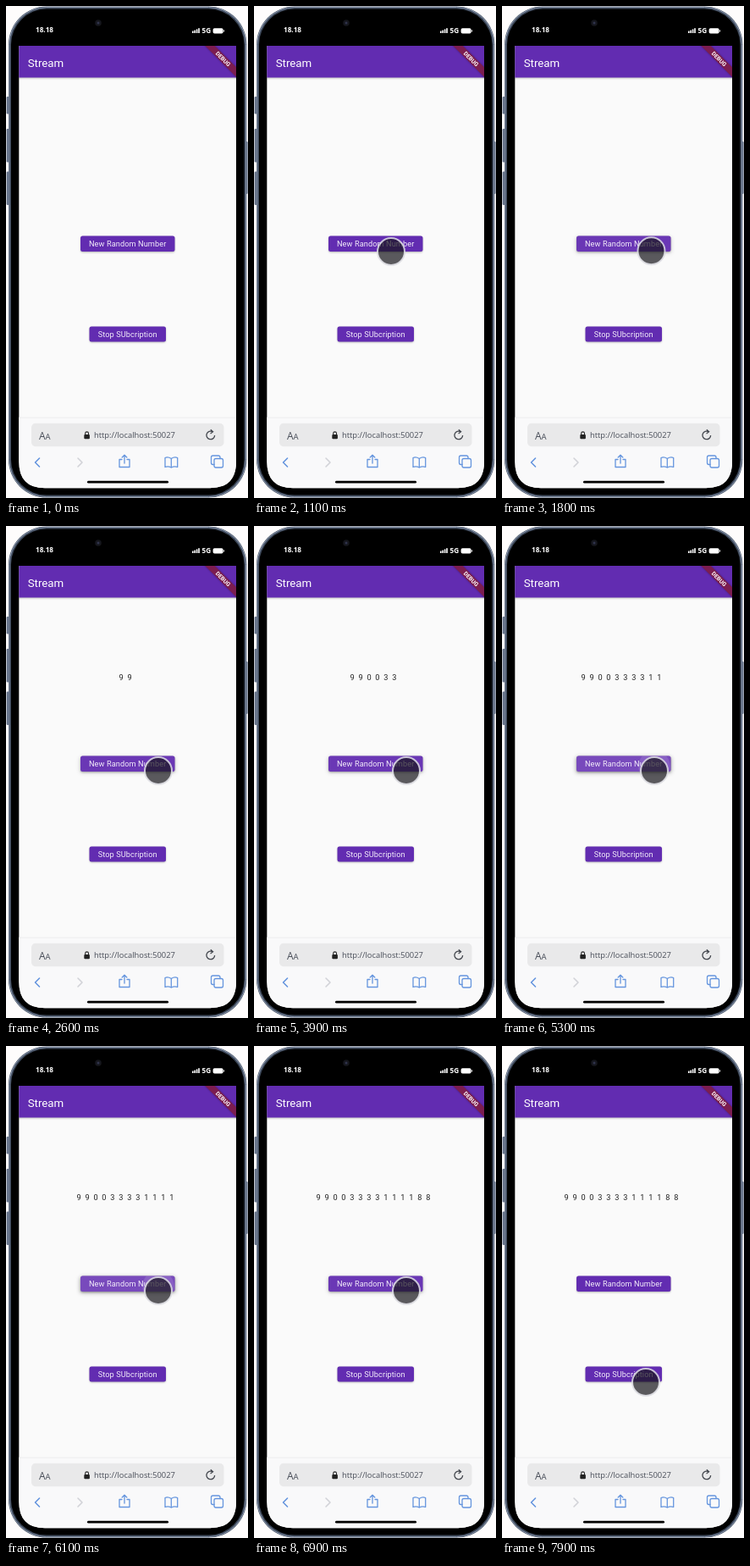
Write an HTML page that moves like this. It is 286x581 px and loops after 8000 ms.

```html
<!DOCTYPE html>
<html lang="en">
<head>
<meta charset="utf-8">
<title>Stream</title>
<style>
  html, body { margin: 0; width: 100%; height: 100%; overflow: hidden; background: #fefcfc; }
  svg { display: block; width: 100vw; height: 100vh; }
  text { font-family: Roboto, sans-serif; fill: #fff; white-space: pre; }
  .label { font-size: 9.2px; letter-spacing: .09px; text-anchor: middle; fill: #f3edfa; }
  .status { font-size: 8.2px; font-weight: 700; font-family: "Open Sans", sans-serif; }
  .bar { font-family: "Open Sans", sans-serif; fill: #484d58; }
  .icon { fill: none; stroke: #6595de; stroke-width: 1.3; stroke-linecap: round; stroke-linejoin: round; }
</style>
</head>
<body>
<svg viewBox="0 0 286 581">
  <defs>
    <clipPath id="screen"><path d="M15.3 47H272V538Q272 569.3 241 569.3H46Q15.3 569.3 15.3 538Z"/></clipPath>
    <clipPath id="face"><rect x="88" y="271.5" width="111.5" height="18.5" rx="2.5"/></clipPath>
    <filter id="soft" x="-20%" y="-60%" width="140%" height="240%"><feGaussianBlur stdDeviation="1.1"/></filter>
    <filter id="wide" x="-20%" y="-60%" width="140%" height="240%"><feGaussianBlur stdDeviation="2.8"/></filter>
  </defs>

  <!-- phone body -->
  <g fill="#66738a">
    <rect x=".6" y="107" width="4" height="20.5" rx="1.2"/>
    <rect x=".6" y="145" width="4" height="39.5" rx="1.2"/>
    <rect x=".6" y="195.5" width="4" height="39.5" rx="1.2"/>
    <rect x="282" y="160" width="3.6" height="62" rx="1.2"/>
  </g>
  <rect x="3" y=".6" width="281.4" height="580" rx="45" fill="#3e495b"/>
  <rect x="3.9" y="1.5" width="279.6" height="578.2" rx="44" fill="none" stroke="#8d9ab0" stroke-width="1"/>
  <rect x="6" y="3.6" width="275.4" height="574" rx="42"/>
  <circle cx="109" cy="20" r="3.8" fill="#15161c"/>
  <circle cx="109" cy="20" r="1.5" fill="#30344c"/>

  <!-- status bar -->
  <text class="status" x="35" y="31">18.18</text>
  <text class="status" x="231.6" y="32.2">5G</text>
  <g fill="#fff">
    <rect x="220" y="29.5" width="1.6" height="2.5"/>
    <rect x="222.4" y="28.6" width="1.6" height="3.4"/>
    <rect x="224.8" y="27.4" width="1.6" height="4.6"/>
    <rect x="227.2" y="26.2" width="1.6" height="5.8"/>
    <rect x="244.6" y="26.2" width="12" height="6.4" rx="1.8"/>
    <rect x="257.1" y="28.2" width="1" height="2.4" rx=".5"/>
  </g>

  <g clip-path="url(#screen)">
    <rect x="15" y="47" width="257" height="524" fill="#fafafa"/>
    <rect x="10" y="50" width="267" height="35.4" opacity=".25" filter="url(#soft)"/>
    <rect x="15" y="47" width="257" height="37.5" fill="#622cb1"/>
    <text x="25.7" y="71.6" font-size="13.3">Stream</text>
    <g transform="translate(256.5 62.5) rotate(45)">
      <rect x="-40" y="-4" width="80" height="8" opacity=".35" filter="url(#soft)"/>
      <rect x="-40" y="-4" width="80" height="8" fill="#7c1d50"/>
      <text y="2.4" font-size="6.8" font-weight="700" text-anchor="middle">DEBUG</text>
    </g>

    <text id="digits" y="182" font-size="9.2" letter-spacing="4.83" style="fill:#222"></text>

    <rect x="88.3" y="272.5" width="111" height="18.5" rx="2.5" opacity=".28" filter="url(#soft)"/>
    <rect id="lift" x="87" y="272.5" width="113.5" height="19.5" rx="3" filter="url(#wide)"/>
    <rect x="88" y="271.5" width="111.5" height="18.5" rx="2.5" fill="#622cb1"/>
    <g clip-path="url(#face)" fill="#fff">
      <rect id="tint" x="88" y="271.5" width="111.5" height="18.5"/>
      <circle id="ripple" cx="180" cy="284"/>
    </g>
    <text class="label" x="143.7" y="284.4">New Random Number</text>

    <rect x="98.8" y="379.3" width="90" height="18" rx="2.5" opacity=".28" filter="url(#soft)"/>
    <rect x="98.5" y="378.5" width="90.5" height="18" rx="2.5" fill="#622cb1"/>
    <text class="label" x="143.7" y="390.8">Stop SUbcription</text>

    <!-- browser bar -->
    <rect x="15" y="486" width="257" height="85" fill="#f9f9fa"/>
    <path d="M15 486H272" stroke="#ececee"/>
    <rect x="30" y="492.8" width="227.5" height="27.5" rx="5" fill="#e9e9ea"/>
    <text class="bar" x="39" y="511.5" font-size="12">A<tspan font-size="9.5">A</tspan></text>
    <rect x="92.3" y="506" width="6.6" height="5.3" rx="1" fill="#222"/>
    <path d="M93.7 506V504.8a1.9 1.9 0 0 1 3.8 0V506" fill="none" stroke="#222" stroke-width="1.1"/>
    <text class="bar" x="104" y="510.3" font-size="9.37">http://localhost:50027</text>
    <path d="M246.6 507a4.8 4.8 0 1 1-2.5-4.3M241.8 500.2L244.6 502.8L241.6 505" fill="none" stroke="#44484f" stroke-width="1.3"/>
    <g class="icon">
      <path d="M39.5 534L34.5 539L39.5 544" stroke-width="1.6"/>
      <path d="M85 534L90 539L85 544" stroke="#d2d3d8" stroke-width="1.6"/>
      <path d="M137 535.5H134V544.5H146V535.5H143M140 540V530.5M137.2 533L140 530.3L142.8 533"/>
      <path d="M195.3 534.5Q191.5 532 188 533.5V544.5Q191.5 543 195.3 545Q199 543 202.7 544.5V533.5Q199 532 195.3 534.5V545"/>
      <path d="M246 541.5H244.5Q242.5 541.5 242.5 539.5V533Q242.5 531 244.5 531H251Q253 531 253 533V534.5"/>
      <rect x="246" y="534.5" width="10.5" height="10.5" rx="2"/>
    </g>
    <rect x="96" y="560.8" width="96" height="2.8" rx="1.4"/>
    <g id="cursor">
      <circle r="15.6" fill="#18161c" opacity=".7"/>
      <circle r="16" fill="none" stroke="#dcdce2" stroke-width="2" opacity=".85"/>
    </g>
  </g>
</svg>
<script>
const $ = id => document.getElementById(id);
const LOOP = 8000;
const presses = [2500, 3250, 3800, 4500, 5250, 6050, 6800];
const values = "9033118";
// cursor stops: time, x, y
const path = [[300, 150, 600], [1050, 162, 290], [1300, 162, 290], [2000, 180, 289],
              [7000, 180, 289], [7600, 170, 397], [LOOP, 170, 397]];

const clamp = v => Math.max(0, Math.min(1, v));
const ease = v => v * v * (3 - 2 * v);
const set = (id, name, value) => $(id).setAttribute(name, value);

function cursorAt(t) {
  let i = 0;
  while (i < path.length - 2 && t >= path[i + 1][0]) i++;
  const [t0, x0, y0] = path[i], [t1, x1, y1] = path[i + 1];
  const k = ease(clamp((t - t0) / (t1 - t0)));
  return [x0 + (x1 - x0) * k, y0 + (y1 - y0) * k];
}

function draw(t) {
  const count = presses.filter(p => t >= p).length;
  $("digits").textContent = [...values.slice(0, count)].map(d => d + d).join("");
  set("digits", "x", 141 - 5 * (2 * count - 1) - 2.6);

  const [x, y] = cursorAt(t);
  set("cursor", "transform", `translate(${x} ${y})`);
  set("cursor", "visibility", t < 300 ? "hidden" : "visible");

  const hover = clamp((t - 1500) / 200) * clamp((7250 - t) / 150);
  let glow = 0, spread = 0;
  for (const p of presses) {
    const g = clamp((t - p + 150) / 100) * clamp((p + 100 - t) / 45);
    if (g > glow) [glow, spread] = [g, clamp((t - p + 150) / 220)];
  }
  set("tint", "opacity", .05 * hover + .09 * glow);
  set("ripple", "r", 6 + 14 * spread);
  set("ripple", "opacity", .12 * glow);
  set("lift", "opacity", .12 * hover + .13 * glow);
}

function frame() {
  draw(performance.now() % LOOP);
  requestAnimationFrame(frame);
}
frame();
</script>
</body>
</html>
```
